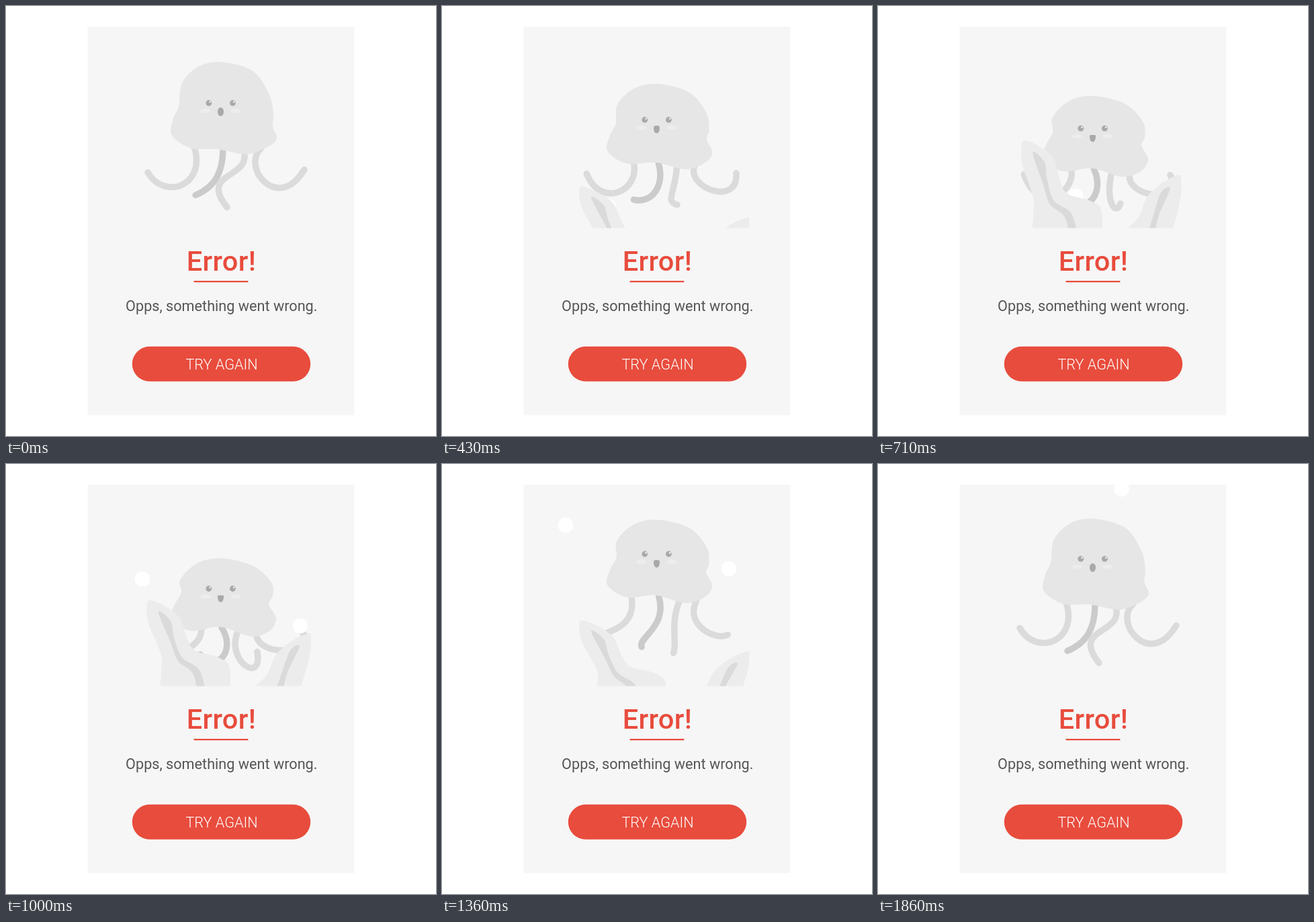
Write an HTML page that moves like this. It is 640x640 px and loops after 1.93 s.

```html
<!DOCTYPE html>
<html lang="en">
<head>
<meta charset="utf-8">
<title>Error card</title>
<style>
  html, body { margin: 0; width: 100%; height: 100%; overflow: hidden; background: #fff; }
  svg { display: block; width: 100vw; height: 100vh; font-family: Roboto, sans-serif; text-anchor: middle; }
  .arm { fill: none; stroke: #dbdbdb; stroke-width: 9.4; stroke-linecap: round; }
  .arm.dark { stroke: #cbcbcb; }
  .leaf { fill: #ececec; }
  .vein { fill: #dadada; }
  .ink { fill: #a9a9a9; }
  .cheek { fill: #ededed; }
  .glint { fill: #f4f4f4; }
</style>
</head>
<body>
<svg viewBox="0 0 640 640">
  <defs><clipPath id="stage"><rect width="640" height="330.5"/></clipPath></defs>
  <rect x="121.6" y="30.8" width="396.8" height="578.2" fill="#f6f6f6"/>
  <g clip-path="url(#stage)">
    <g id="arms"></g>
    <g id="bubbles" fill="#fff"></g>
    <path id="body" fill="#e6e6e6"/>
    <g id="face"><path id="mouth" class="ink"/></g>
    <g id="leaves"></g>
  </g>
  <text x="320.5" y="394" font-size="41.5" font-weight="500" letter-spacing=".4" fill="#e84c3d">Error!</text>
  <path d="M279.6 410.1H360.4" stroke="#e84c3d" stroke-width="2.1"/>
  <text x="320.8" y="454.3" font-size="21.65" fill="#555">Opps, something went wrong.</text>
  <rect x="187.8" y="506.8" width="265.4" height="52" rx="26" fill="#e84c3d"/>
  <text x="321.1" y="541" font-size="21.65" font-weight="300" fill="#fff">TRY AGAIN</text>
</svg>
<script>
const LOOP = 1930, FPS = 14;
const $ = id => document.getElementById(id);
const lerp = (a, b, k) => a + (b - a) * k;
const clamp = v => Math.max(0, Math.min(1, v));
const points = text => text.split(' ').map(p => p.split(',').map(Number));
const mix = (a, b, k) => a.map(([x, y], i) => [lerp(x, b[i][0], k), lerp(y, b[i][1], k)]);
const shift = (pts, dy) => pts.map(([x, y]) => [x, y + dy]);

function add(parent, tag, attrs) {
  const el = document.createElementNS('http://www.w3.org/2000/svg', tag);
  for (const name in attrs) el.setAttribute(name, attrs[name]);
  return $(parent).appendChild(el);
}

// Closed Catmull-Rom outline
function outline(pts) {
  const at = i => pts[(i + pts.length) % pts.length];
  const handle = (p, from, to) => p.map((v, j) => v + (to[j] - from[j]) / 6);
  return pts.reduce((d, p, i) => {
    const next = at(i + 1);
    return d + 'C' + [handle(p, at(i - 1), next), handle(next, at(i + 2), p), next];
  }, 'M' + pts[0]) + 'Z';
}

// Cubic that passes b and c at one and two thirds of the way
function strand([a, b, c, d]) {
  const handle = (p, q, r, s) => p.map((v, j) => (-5 * v + 18 * q[j] - 9 * r[j] + 2 * s[j]) / 6);
  return 'M' + a + 'C' + [handle(a, b, c, d), handle(d, c, b, a), d];
}

// Smooth function of time through [time, value] keys, flat at its extremes
function curve(...keys) {
  const last = keys.length - 1;
  const slope = i => (keys[i + 1][1] - keys[i][1]) / (keys[i + 1][0] - keys[i][0]);
  const tangent = keys.map((_, i) => {
    const a = slope(Math.max(0, i - 1)), b = slope(Math.min(last - 1, i));
    return a * b <= 0 ? 0 : 2 * a * b / (a + b);
  });
  return t => {
    let i = 0;
    while (i < last - 1 && t >= keys[i + 1][0]) i++;
    const [t0, v0] = keys[i], [t1, v1] = keys[i + 1];
    const w = t1 - t0, u = (t - t0) / w, r = 1 - u;
    return v0 * r * r * (1 + 2 * u) + v1 * u * u * (3 - 2 * u)
      + w * u * r * (tangent[i] * r - tangent[i + 1] * u);
  };
}

const faceY = curve([0, 144.5], [430, 169.5], [710, 182.2], [1000, 185.5],
  [1140, 167.5], [1360, 134], [1530, 126], [LOOP, 145]);
const squash = curve([0, 0], [430, .47], [1000, 1], [1360, .62], [LOOP, 0]);
// Arms go rest (0) > gathered (1) > trailing (2) > rest (3)
const armPhase = curve([0, 0], [430, .47], [1000, 1], [1360, 1.82], [1640, 2], [1860, 3], [LOOP, 3]);
const leafY = curve([0, 175], [430, 58], [760, -1], [1000, -1], [1360, 22], [1640, 107], [LOOP, 190]);
const leafStretch = t => Math.sin(Math.PI * clamp((t - 430) / 700));

// Shapes of the jellyfish are measured from eye level
const bodyTall = points('320,-61 367,-48 392,-12 398,18 397,35 403,53 388,66 358,76 316,69 275,67 247,48 249,23 257,5 262,-30 286,-54');
const bodyFlat = points('323,-45 369,-33 395,-9 397,11 391,23 402,45 391,64 364,71 319,57 276,63 246,46 250,26 261,5 259,-13 285,-38');

function arm(cls, ...poses) {
  const shapes = poses.map(points), el = add('arms', 'path', { class: cls });
  return t => {
    const phase = armPhase(t), i = Math.min(2, Math.floor(phase));
    const pose = mix(shapes[i], shapes[(i + 1) % 3], phase - i);
    el.setAttribute('d', strand(shift(pose, faceY(t))));
  };
}

function bubble(x, y) {
  const el = add('bubbles', 'circle', { r: 11.3 });
  return t => {
    el.setAttribute('cx', x(t));
    el.setAttribute('cy', y(t));
  };
}

// Leaf parts are pulled by (dx, dy) the more, the higher they are above their foot
function leaf(cls, { foot, height, dx, dy }, text) {
  const el = add('leaves', 'path', { class: cls }), shape = points(text);
  return t => {
    const pull = leafStretch(t), rise = leafY(t);
    el.setAttribute('d', outline(shape.map(([x, y]) => {
      const k = pull * clamp((foot - y) / height);
      return [x + dx * k, y + dy * k + rise];
    })));
  };
}

const left = { foot: 290, height: 78, dx: 11, dy: -13 };
const right = { foot: 340, height: 83, dx: -7, dy: -7 };

const parts = [
  arm('arm', '280,65 276,110 244,125 211,103', '291,60 276,86 245,90 220,54', '280,64 276,100 256,119 237,138'),
  arm('arm dark', '323,68 319,98 306,121 282,137', '321,58 328,90 313,108 289,98', '323,64 319,102 302,126 299,147'),
  arm('arm', '354,72 343,100 319,119 329,155', '345,64 346,102 366,118 374,94', '355,72 346,102 342,130 338,159'),
  arm('arm', '380,67 374,102 403,126 444,99', '372,67 401,91 440,84 431,57', '380,70 374,103 393,127 424,134'),

  bubble(curve([0, 270], [430, 248], [1000, 203], [1360, 184], [LOOP, 218]), t => 394 - .2228 * t),
  bubble(t => 438 - 1.15e-4 * (t - 1050) ** 2, t => 478 - .237 * t),
  bubble(t => 277.6 + .0231 * t, t => 449.4 - .2344 * t),

  leaf('leaf', left, '204,219 209,211 233,220 255,236 268,264 281,280 316,289 333,305 322,350 238,350 231,312 232,290 221,266 208,242'),
  leaf('vein', left, '222,227 241,239 248,262 262,289 288,308 298,350 288,350 278,313 256,294 243,268'),
  leaf('leaf', right, '455,257 457,265 455,286 440,330 420,370 360,350 389,316 405,287 430,267'),
  leaf('vein', right, '440,274 431,293 420,313 408,350 402,340 413,310 426,281')
];

for (const [dx, r] of [[-17.8, 4.4], [17.8, 4.4]]) {
  add('face', 'ellipse', { class: 'cheek', cx: 319.4 + dx * 1.27, cy: 11.6, rx: 7.8, ry: 3 });
  add('face', 'circle', { class: 'ink', cx: 319.6 + dx, cy: 0, r });
  add('face', 'circle', { class: 'glint', cx: 321.4 + dx, cy: -1.7, r: 1.3 });
}
$('mouth').setAttribute('transform', 'translate(319.5 0)');

// Round mouth at 0, flat-topped smile at 1
function mouth(k) {
  const top = 6.5 + 3.5 * k, side = 13 - 1.5 * k, low = 19.5 + .7 * k, cx = 2.5 + 2 * k, cy = lerp(9.4, 10, k);
  return `M-4.5 ${side}C-4.5 ${cy} ${-cx} ${top} 0 ${top}S4.5 ${cy} 4.5 ${side}`
    + `C4.5 ${low - 3} 2.5 ${low} 0 ${low}S-4.5 ${low - 3} -4.5 ${side}Z`;
}

function draw(t) {
  const y = faceY(t), k = squash(t);
  $('body').setAttribute('d', outline(shift(mix(bodyTall, bodyFlat, k), y)));
  $('face').setAttribute('transform', `translate(0 ${y})`);
  $('mouth').setAttribute('d', mouth(Math.min(1, k * 1.2)));
  for (const part of parts) part(t);
}

// Steps fall on the 14 fps beat, rounded to 10 ms
const stepTime = i => Math.round(i * 100 / FPS) * 10;
function held(t) {
  let i = 0;
  while (stepTime(i + 1) <= t) i++;
  return stepTime(i);
}

const start = performance.now();
function tick() {
  draw(held((performance.now() - start) % LOOP));
  requestAnimationFrame(tick);
}
tick();
</script>
</body>
</html>
```
